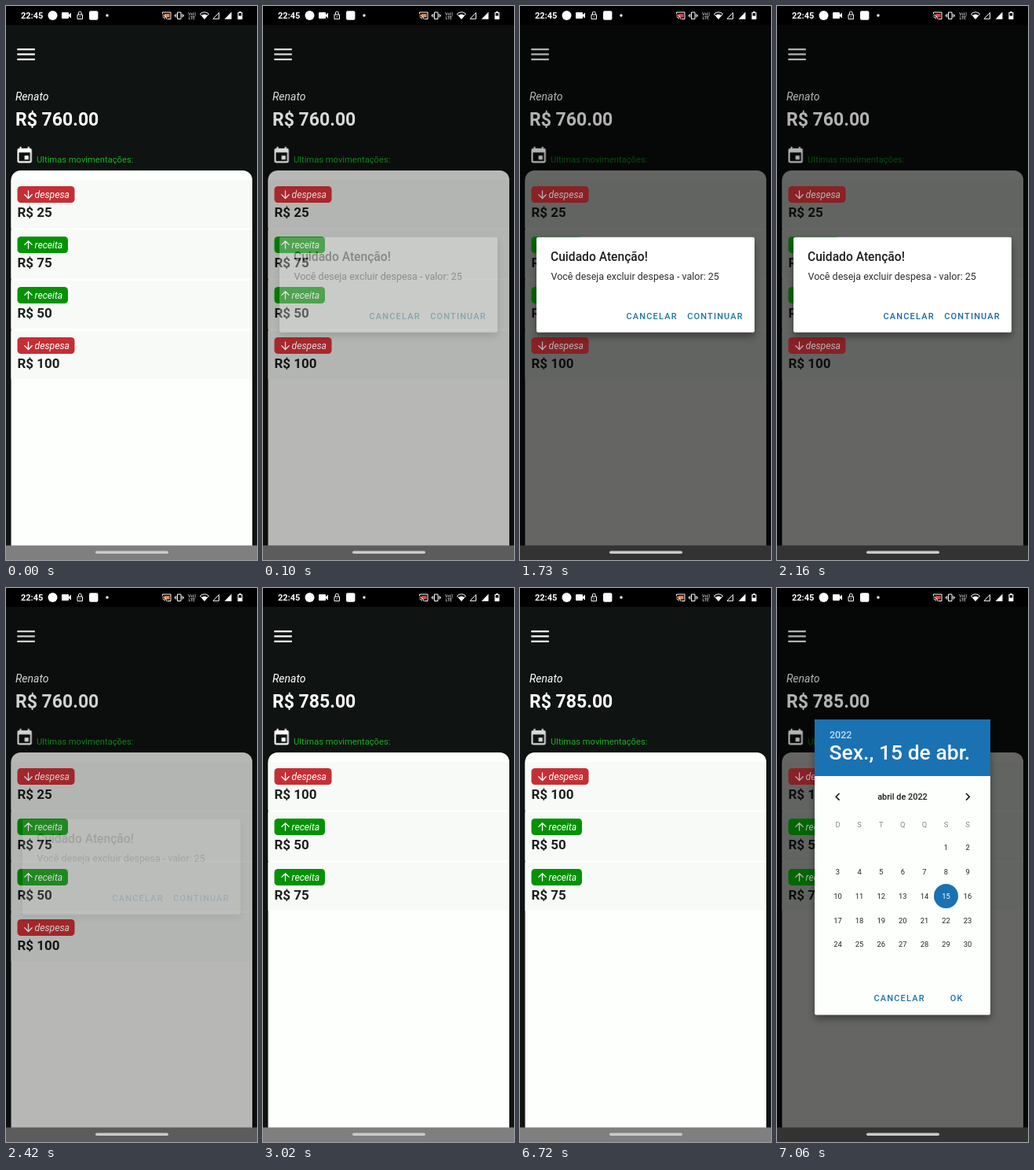
An HTML page for the animation above (8 s loop, 320 px wide and 704 px high).

```html
<!DOCTYPE html>
<html lang="pt-BR">
<head>
<meta charset="utf-8">
<title>Movimentações</title>
<style>
html, body { margin: 0; width: 100%; height: 100%; overflow: hidden; background: #000; }
svg { display: block; width: 100vw; height: 100vh; font-family: Roboto, sans-serif; }
text { white-space: pre; }
.bold { font-weight: 700; }
.medium { font-weight: 500; }
.italic { font-style: italic; }
.mid { text-anchor: middle; }
.button { font-size: 11px; font-weight: 500; letter-spacing: 1.15px; }
.amount { font-size: 17px; font-weight: 700; fill: #1c1f1d; }
.line { fill: none; stroke: #fff; }
.sheet { filter: drop-shadow(0 5px 5px rgba(0, 0, 0, .38)); }

.before, .after, .dim, .lit, .alert, .picker, .event, .accent, .cast {
  animation: 8s step-end infinite;
}
.before { animation-name: before; }
.after { animation-name: after; }
.dim { animation-name: dim; }
.lit { animation-name: lit; }
.alert { animation-name: alert; }
.picker { animation-name: picker; }
.event { animation-name: event; }
.accent { animation-name: accent; }
.cast { animation-name: cast; }

@keyframes before { 0% { visibility: visible; } 32.375%, 100% { visibility: hidden; } }
@keyframes after { 0% { visibility: hidden; } 32.375%, 100% { visibility: visible; } }
@keyframes dim {
  0% { opacity: 0; } 1.25% { opacity: .28; } 3.375% { opacity: .6; }
  30.25% { opacity: .28; } 32.375% { opacity: 0; }
  86.125% { opacity: .3; } 88.25%, 100% { opacity: .6; }
}
@keyframes lit {
  0% { filter: brightness(1); } 1.25% { filter: brightness(.85); } 3.375% { filter: brightness(.7); }
  30.25% { filter: brightness(.82); } 32.375% { filter: brightness(1); }
  86.125% { filter: brightness(.85); } 88.25%, 100% { filter: brightness(.7); }
}
@keyframes alert {
  0% { opacity: 0; } 1.25% { opacity: .3; } 3.375% { opacity: .95; } 5.5% { opacity: 1; }
  30.25% { opacity: .12; } 32.375%, 100% { opacity: 0; }
}
@keyframes picker { 0% { opacity: 0; } 86.125% { opacity: .5; } 88.25%, 100% { opacity: 1; } }
@keyframes event { 0% { opacity: 1; } 76.375% { opacity: .24; } 84% { opacity: .85; } 86.125%, 100% { opacity: 1; } }
@keyframes accent { 0% { fill: #1a879c; } 21.625% { fill: #1b77a5; } 23.75%, 100% { fill: #1c67ae; } }
@keyframes cast {
  0% { fill: #e08a55; } 3.375% { fill: #d84848; } 30.25% { fill: #e08a55; }
  37.75% { fill: #d84848; } 76.375% { fill: #e08a55; } 88.25%, 100% { fill: #d84848; }
}
</style>
</head>
<body>
<svg viewBox="0 0 320 704" preserveAspectRatio="none">
  <rect width="320" height="704" fill="#0f1311"/>
  <rect width="320" height="24"/>
  <path d="M6.5 686V221a12 12 0 0 1 12-12H302a12 12 0 0 1 12 12V686z" fill="#fdfffc"/>
  <text x="39" y="199" font-size="11.2" fill="#16b422">Ultimas movimentações:</text>
  <g id="rows"></g>
  <rect y="685.5" width="320" height="18.5" fill="#7f7f7f"/>

  <rect class="dim" y="24" width="320" height="680"/>

  <g class="lit" fill="#fff">
    <path d="M14.3 54h22.5v2.3H14.3zm0 6.3h22.5v2.3H14.3zm0 6.5h22.5v2.3H14.3z"/>
    <text class="italic" x="12" y="120" font-size="14">Renato</text>
    <text class="bold before" x="12" y="152" font-size="23">R$ 760.00</text>
    <text class="bold after" x="12" y="152" font-size="23">R$ 785.00</text>
    <path class="event" transform="translate(11.4 177.8) scale(1.02)"
      d="M17 12h-5v5h5zM16 1v2H8V1H6v2H5a2 2 0 0 0-2 2v14a2 2 0 0 0 2 2h14a2 2 0 0 0 2-2V5a2 2 0 0 0-2-2h-1V1zm3 18H5V8h14z"/>
    <g id="badges"></g>
  </g>
  <rect x="114" y="692.5" width="93" height="3.6" rx="1.8" fill="#cacaca"/>

  <g id="status" fill="#fff">
    <text class="bold" x="19" y="16" font-size="11">22:45</text>
    <circle cx="59.5" cy="12" r="6"/>
    <path d="M72 8h7a1 1 0 0 1 1 1v2l3-2.5v7L80 13v2a1 1 0 0 1-1 1h-7a1 1 0 0 1-1-1V9a1 1 0 0 1 1-1z"/>
    <path class="line" d="M91 11h6.5v5.5H91zM92.4 11V9a1.9 1.9 0 0 1 3.8 0v2M94.2 13v1.5"/>
    <rect x="106" y="6.3" width="11.4" height="11.4" rx="2"/>
    <circle cx="129" cy="12" r="1.7"/>
    <rect class="cast" x="202" y="10" width="6.5" height="4.5"/>
    <path class="line" d="M199.5 10V8H210v8.5h-4.5M199.5 11.5a5 5 0 0 1 5 5M199.5 13.7a2.8 2.8 0 0 1 2.8 2.8"/>
    <path class="line" d="M218.5 8h4.5v8.5h-4.5zM216.8 10v4.5M224.8 10v4.5M215.2 11v2.5M226.3 11v2.5"/>
    <text x="232" y="11.5" font-size="5.5">Vo))</text>
    <text x="232.5" y="16.5" font-size="5.5">LTE</text>
    <path class="line" d="M247.5 10a8 8 0 0 1 11 0L253 16.5z"/>
    <path d="M249.5 12a5 5 0 0 1 7 0L253 16.5z"/>
    <path class="line" d="M264 16.3h7.5V8.5z"/>
    <path d="M278.5 16.8h9V7.5z"/>
    <path class="line" d="M296 8.5h4.8v8H296z" stroke-width="1.2"/>
    <path d="M297.3 6.8h2.2V8.500h-2.200zM296 12.500h4.800v4H296z"/>
  </g>

  <g class="alert">
    <rect class="sheet" x="21" y="293.800" width="278" height="121" rx="2" fill="#fefffe"/>
    <text class="medium" x="39" y="324.300" font-size="15.600" fill="#1c1f1e">Cuidado Atenção!</text>
    <text x="39.500" y="348" font-size="12.500" fill="#2c2f2e">Você deseja excluir despesa - valor: 25</text>
    <g class="button accent">
      <text x="135.500" y="398">CANCELAR</text>
      <text x="213.200" y="398">CONTINUAR</text>
    </g>
  </g>

  <g class="picker">
    <rect class="sheet" x="48" y="167" width="224" height="375.500" rx="2" fill="#fdfffd"/>
    <path d="M48 239V169a2 2 0 0 1 2-2H270a2 2 0 0 1 2 2V239z" fill="#1a72b3"/>
    <text class="medium" x="67" y="190.500" font-size="12.500" fill="#c5dbeb">2022</text>
    <text class="medium" x="66.500" y="218" font-size="26.500" fill="#fff">Sex., 15 de abr.</text>
    <path d="M79.500 261l-4.300 4.300 4.300 4.300M241 261l4.300 4.300-4.300 4.300" fill="none" stroke="#151515" stroke-width="1.600"/>
    <text class="medium mid" x="160" y="269" font-size="10.900" fill="#1b1b1b">abril de 2022</text>
    <g id="days" class="mid" font-size="9.400"></g>
    <g class="button" fill="#1a72b3">
      <text x="123.500" y="525.300">CANCELAR</text>
      <text x="220.800" y="525.300">OK</text>
    </g>
  </g>
</svg>
<script>
const lists = {
  before: [['despesa', 25], ['receita', 75], ['receita', 50], ['despesa', 100]],
  after: [['despesa', 100], ['receita', 50], ['receita', 75]]
};
const fill = (id, markup) => { document.getElementById(id).innerHTML = markup; };

const row = ([, value], i) => `<g transform="translate(0 ${i * 64})">
  <rect x="6.5" y="221" width="307.5" height="61" fill="#f7faf7"/>
  <text class="amount" x="14.5" y="268.3">R$ ${value}</text></g>`;

const badge = ([kind], i) => {
  const expense = kind === 'despesa';
  return `<g transform="translate(0 ${i * 64})">
    <rect x="14.5" y="229" width="${expense ? 73 : 64.5}" height="21" rx="4.500" fill="${expense ? '#c42f35' : '#049204'}"/>
    <path class="line" stroke-width="1.300" stroke-linecap="round"
      d="M28.500 235v9.500m-4.700-4.700l4.700 4.700 4.700-4.700" ${expense ? '' : 'transform="rotate(180 28.5 239.6)"'}/>
    <text class="italic" x="36.500" y="244" font-size="12.200">${kind}</text></g>`;
};

const perList = draw => Object.entries(lists)
  .map(([name, items]) => `<g class="${name}">${items.map(draw).join('')}</g>`).join('');
fill('rows', perList(row));
fill('badges', perList(badge));

const columnX = i => 77.5 + 27.6 * i;
const cell = (label, column, y, color) =>
  `<text x="${columnX(column)}" y="${y}" fill="${color}">${label}</text>`;
const firstColumn = 5, selected = 15;
let month = [...'DSTQQSS'].map((letter, i) => cell(letter, i, 303.5, '#858585')).join('');
month += `<circle cx="${columnX(5)}" cy="391.500" r="15.500" fill="#1a72b3"/>`;
for (let day = 1; day <= 30; day++) {
  const slot = day + firstColumn - 1;
  month += cell(day, slot % 7, 333.2 + 30.8 * Math.floor(slot / 7), day === selected ? '#fff' : '#222');
}
fill('days', month);
</script>
</body>
</html>
```
